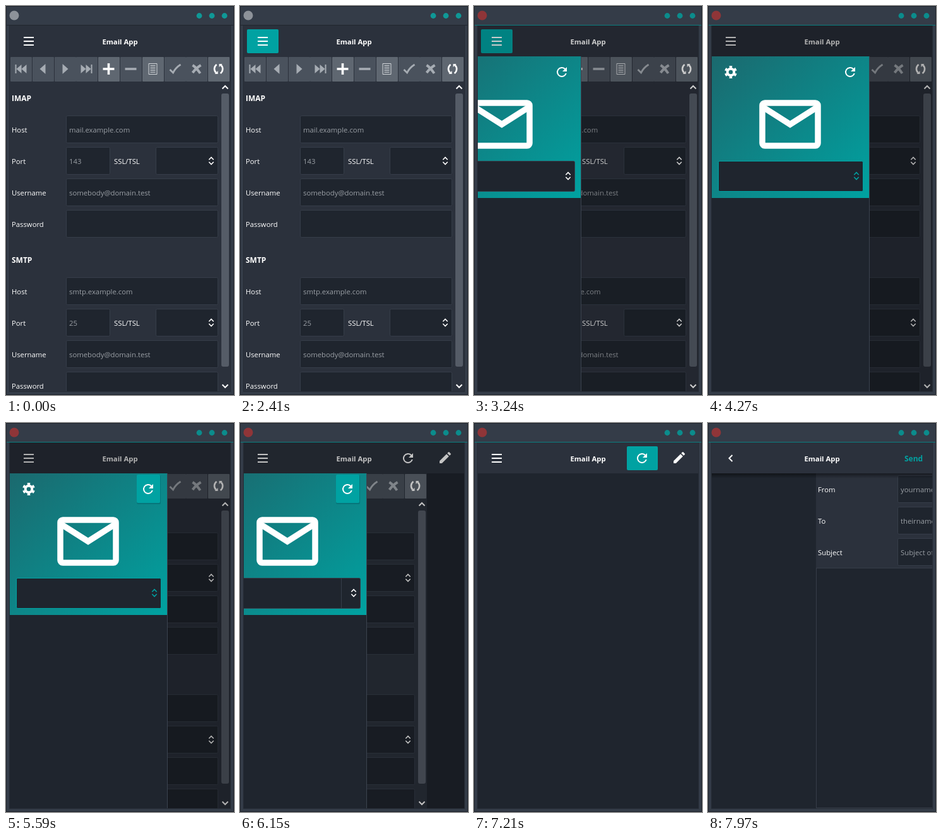
Write an HTML page that moves like this. It is 361 px wide and 618 px high and loops after 8 s.

```html
<!DOCTYPE html>
<html lang="en">
<head>
<meta charset="utf-8">
<title>Email App</title>
<style>
html, body { margin: 0; width: 100%; height: 100%; overflow: hidden; background: #2b313c; }
svg { display: block; width: 361px; height: 618px; font: 11.3px "Open Sans", "Noto Sans", sans-serif; }
text { fill: #fff; }
.bold { font-weight: 700; font-size: 12px; }
.hint { fill: #9a9fa5; }
.field { fill: #1f252e; stroke: #363d49; }
.line { fill: none; stroke: #fff; stroke-width: 2; }
.hot .field, .hot .line { stroke: #00a2a2; }
.accent, text.accent { fill: #00a2a2; }
</style>
</head>
<body>
<svg id="stage" viewBox="0 0 361 618"></svg>
<script>
const LOOP = 8000, PAGE = 349, MENU = 249;
const stage = document.getElementById("stage");

const rect = (x, y, w, h, attrs = "") => `<rect x="${x}" y="${y}" width="${w}" height="${h}" ${attrs}/>`;
const label = (x, y, text, cls = "") => `<text x="${x}" y="${y}" class="${cls}">${text}</text>`;
const line = (d, attrs = "") => `<path class="line" d="${d}" ${attrs}/>`;
const group = (id, content, attrs = "") => `<g id="${id}" ${attrs}>${content}</g>`;
const icon = (x, y, d) => `<path transform="translate(${x - 12} ${y - 12})" fill="#fff" d="${d}"/>`;
const field = (x, y, w, hint = "", h = 44) =>
  rect(x + .5, y + .5, w - 1, h - 1, 'rx="2" class="field"') + label(x + 5, y + 27, hint, "hint");
const combo = (id, x, y, w, h = 44) => {
  const cx = x + w - 11, cy = y + Math.floor(h / 2);
  return group(id, field(x, y, w, "", h) +
    line(`M${cx - 3.7} ${cy - 1.8}l3.7 -3.7l3.7 3.7M${cx - 3.7} ${cy + 1.8}l3.7 3.7l3.7 -3.7`, 'style="stroke-width:1.6"'));
};

const RELOAD = "M17.65 6.35A8 8 0 1 0 19.73 14h-2.08A6 6 0 1 1 12 6c1.66 0 3.14.69 4.22 1.78L13 11h7V4z";
const PENCIL = "M3 17.25V21h3.75L17.81 9.94l-3.75-3.75zM20.71 7.04a1 1 0 0 0 0-1.41l-2.34-2.34a1 1 0 0 0-1.41 0l-1.83 1.83 3.75 3.75z";

// Toolbar icons are drawn around their own centre
const filled = d => `<path fill="currentColor" d="${d}"/>`;
const stroked = (d, w) => `<path fill="none" stroke="currentColor" stroke-width="${w}" d="${d}"/>`;
const tools = [
  filled("M-9 -7h2v14h-2zM-7 0l8 -7v14zM1 0l8 -7v14z"),
  filled("M-5 0l9 -8v16z"),
  filled("M5 0l-9 -8v16z"),
  filled("M9 -7h-2v14h2zM7 0l-8 -7v14zM-1 0l-8 -7v14z"),
  stroked("M-9 0h18M0 -9v18", 3.6),
  stroked("M-9 0h18", 3.6),
  stroked("M-6.5 -8.5h13v17h-13z", 1) + stroked("M-4 -5.5h8m-8 2.7h8m-8 2.7h8m-8 2.7h8m-8 2.7h8", 1),
  stroked("M-8 1l5 5Q1 -2 9 -7", 2.8),
  stroked("M-6 -6Q0 -2 6 7M7 -6Q-1 -1 -6 6", 4),
  stroked("M-3 -7A8.5 8.5 0 0 0 -4 6M3 7A8.5 8.5 0 0 0 4 -6", 2.6) + filled("M-6 8h5v-5zM6 -8h-5v5z")
];
const toolbar = tools.map((shape, i) => {
  const on = [4, 6, 9].includes(i), x = Math.round(7 + 34.8 * i);
  const color = i == 6 ? "#d0d4d8" : on ? "#fff" : "#a6acb3";
  return rect(x, 81, 34, 39, `rx="1" fill="${on ? "#5f6771" : "#4a525d"}"`) +
    `<g transform="translate(${x + 16.5} 100)" color="${color}">${shape}</g>`;
}).join("");

const server = (y, title, host, port, id) =>
  label(9, y + 4, title, "bold") +
  ["Host", "Port", "Username", "Password"].map((s, i) => label(9, y + 54 + 50 * i, s)).join("") +
  field(95, y + 27, 241, host) + field(95, y + 77, 70, port) +
  label(171, y + 104, "SSL/TSL") + combo(id, 237, y + 77, 99) +
  field(95, y + 127, 241, "somebody@domain.test") + field(95, y + 177, 241);

const settings = rect(6, 80, PAGE, 532, 'fill="#2b313c"') + toolbar +
  server(147, "IMAP", "mail.example.com", 143, "inSecure") +
  server(404, "SMTP", "smtp.example.com", 25, "outSecure") +
  rect(341, 139, 12, 434, 'rx="3" fill="#555c67"') +
  line("M342.5 131.5l4.5 -4.5l4.5 4.5M342.5 601.5l4.5 4.5l4.5 -4.5");

const compose = rect(0, 80, PAGE, 532, 'fill="#2b313c"') +
  [["From", "yourname@domain.test"], ["To", "theirname@domain.test"], ["Subject", "Subject of the email"]]
    .map(([name, hint], i) => label(3, 110 + 50 * i, name) + field(129, 83 + 50 * i, 217, hint)).join("") +
  rect(.5, 230.5, PAGE - 1, 381, 'class="field"');

const gear = `<g transform="translate(36 105)" fill="none" stroke="#fff">
  <circle r="5.3" stroke-width="4"/>
  <circle r="8.2" stroke-width="3.6" pathLength="12" stroke-dasharray="1 1" stroke-dashoffset="-.5"/></g>`;

const menu = rect(6, 80, MENU, 532, 'fill="#1f252e"') + rect(255, 80, 1, 532, 'fill="#3b434f"') +
  rect(6, 80, MENU, 225, 'fill="url(#teal)"') + gear +
  group("menuHot", rect(207, 83, 38, 46, 'rx="2" fill="#06767a"') + rect(207, 82, 37, 45, 'rx="2" class="accent"')) +
  icon(225, 105, RELOAD) +
  '<g fill="none" stroke="#fff" stroke-width="9.5"><rect x="86" y="154" width="88" height="68" rx="4"/><path d="M86 160L130 188L174 160"/></g>' +
  combo("account", 16, 246, 230, 49) + rect(215, 247, 1, 47, 'id="divider" fill="#363d49"');

const hot = (id, x, w) => rect(x, 37, w, 38, `id="${id}" rx="2" class="accent"`);

stage.innerHTML = `<defs>
  <linearGradient id="teal" x2="1" y2="1"><stop stop-color="#1b696e"/><stop offset="1" stop-color="#00a2a1"/></linearGradient>
  <linearGradient id="fade" x2="0" y2="1"><stop stop-color="#000" stop-opacity=".45"/><stop offset="1" stop-opacity="0"/></linearGradient>
  <clipPath id="view">${rect(6, 80, PAGE, 532)}</clipPath></defs>` +
  rect(0, 0, 361, 618, 'fill="#1c2129"') + rect(1, 1, 359, 616, 'fill="#343c48"') +
  rect(5, 30, 351, 583, 'fill="#252b34"') + rect(6, 31, PAGE, 581, 'fill="#2b313c"') +
  rect(1, 30, 359, 1, 'id="edge"') + '<circle id="badge" cx="13" cy="15" r="7.5"/>' +
  group("dots", [306, 326, 346].map(x => `<circle cx="${x}" cy="15.5" r="4.4"/>`).join("")) +
  hot("burgerHot", 11, 50) + line("M28 50h16m-16 6h16m-16 6h16", 'id="burger"') +
  '<text x="180.5" y="61" class="bold" text-anchor="middle" style="font-size:11.3px">Email App</text>' +
  group("listTools", hot("reloadHot", 242, 49) + hot("editHot", 301, 49) + icon(266, 56, RELOAD) + icon(325, 55, PENCIL)) +
  group("mailTools", line("M38.5 51l-5 5l5 5") + label(311, 61, "Send", "bold accent")) +
  group("pages", group("settings", settings) +
    group("list", rect(6, 80, PAGE, 532, 'fill="#1f252e"')) + group("compose", compose) +
    rect(6, 80, PAGE, 8, 'id="shade" fill="url(#fade)"'), 'clip-path="url(#view)"') +
  rect(6, 31, PAGE, 581, 'id="dim"') +
  group("drawerView", group("drawer", menu), 'clip-path="url(#view)"');

const el = Object.fromEntries([...stage.querySelectorAll("[id]")].map(e => [e.id, e]));
const show = (id, on) => el[id].style.display = on ? "" : "none";
const move = (id, x) => el[id].setAttribute("transform", `translate(${Math.round(x)} 0)`);
const fill = (id, color) => el[id].style.fill = color;
const within = (t, a, b) => t >= a && t < b;
// Value held since the latest time reached, 0 before the first
const held = (t, times, values) => values[times.filter(s => s <= t).length - 1] || 0;

const SLIDE = [.08, .22, .37, .52, .655, .83, 1];
const OPEN = [3020, 3080, 3130, 3190, 3240, 3280, 3320];
const CLOSE = [6040, 6100, 6160, 6220, 6280, 6320, 6360];
const WRITE = [7720, 7780, 7840, 7910, 7970];

function draw(t) {
  const open = held(t, OPEN, SLIDE) - held(t, CLOSE, SLIDE);
  const toList = held(t, CLOSE, [.05, .17, .3, .42, .544, .77, 1]);
  const toMail = held(t, WRITE, [.05, .17, .29, .41, .527]);
  const active = t >= 2880, writing = t >= 7720;

  fill("badge", active ? "#8f3538" : "#8d9299");
  fill("edge", active ? "#0b7f80" : "#20262e");
  fill("dots", active ? "#0b8c8c" : "#0f9896");

  show("burger", !writing);
  show("burgerHot", within(t, 2410, 3730));
  fill("burgerHot", within(t, 2880, 3020) ? "#008585" : "#00a2a2");
  show("listTools", t >= 6040 && !writing);
  show("reloadHot", within(t, 7210, 7380));
  show("editHot", t >= 7380);
  show("mailTools", writing);
  show("shade", writing);

  move("settings", -PAGE * toList);
  move("list", PAGE * (1 - toList));
  move("compose", 6 + PAGE * (1 - toMail));
  el.inSecure.classList.toggle("hot", within(t, 1360, 1400));

  el.dim.style.opacity = .3 * open;
  show("drawer", open > 0);
  move("drawer", -MENU * (1 - open));
  show("menuHot", within(t, 4410, 4690) || t >= 5590);
  show("divider", t >= 6040);
  el.account.classList.toggle("hot", within(t, 4270, 6040));
}

const start = performance.now();
function tick() {
  draw((performance.now() - start) % LOOP);
  requestAnimationFrame(tick);
}
tick();
</script>
</body>
</html>
```
